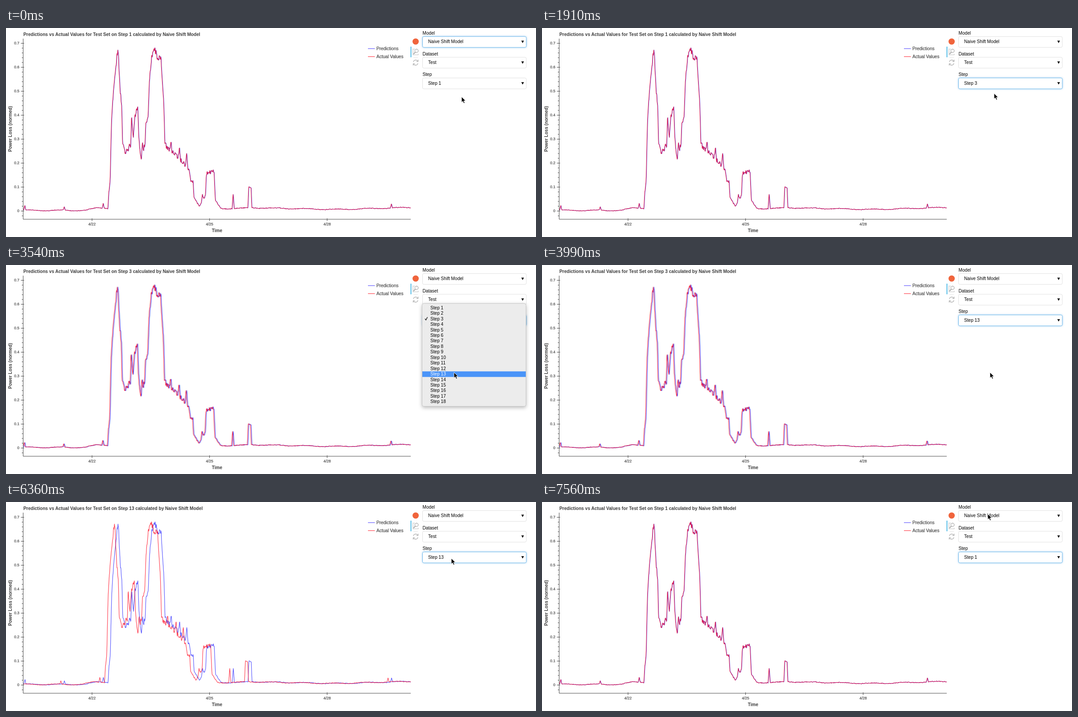
Animation, 1189 px wide and 471 px high, one loop 8 s. Source, as an HTML page:

```html
<!DOCTYPE html>
<html lang="en">
<head>
<meta charset="utf-8">
<title>Predictions vs actual values</title>
<style>
html, body { margin: 0; width: 100%; height: 100%; overflow: hidden; background: #fff; }
svg { display: block; font: 10px "Liberation Sans", Arial, sans-serif; }
.bold { font-weight: bold; font-size: 10.1px; fill: #3c3c3c; }
.soft { fill: #444; stroke: #444; stroke-width: .2; }
.tick { font-size: 8.4px; }
.panel { font-size: 10.1px; }
.axis { stroke: #444; fill: none; }
.icon { stroke: #a4a4a4; fill: none; stroke-width: 1.2; }
.box { fill: #fff; stroke: #e0e0e0; }
.box.focus { stroke: #6fb9ea; filter: drop-shadow(0 0 2px #66afe9a0); }
.line { fill: none; stroke-width: 1.2; stroke-linejoin: round; }
</style>
</head>
<body>
<svg width="1189" height="471" viewBox="0 0 1189 471">
  <clipPath id="plot"><rect x="39" y="24" width="869" height="407"/></clipPath>
  <text id="title" class="bold" x="39" y="17.5"></text>
  <g id="axes"></g>
  <text class="bold" x="473.5" y="459.5" text-anchor="middle">Time</text>
  <text class="bold" transform="translate(13 227.5) rotate(-90)" text-anchor="middle">Power Loss (normed)</text>
  <g clip-path="url(#plot)">
    <path id="predicted" class="line" stroke="#00f" stroke-opacity=".65"/>
    <path id="actual" class="line" stroke="#ff0018" stroke-opacity=".75"/>
  </g>
  <path d="M812 46.5h15.5" stroke="#6a62ff" stroke-width="1.3"/>
  <path d="M812 64.5h15.5" stroke="#ff4a55" stroke-width="1.3"/>
  <text class="soft" x="831" y="50">Predictions</text>
  <text class="soft" x="831" y="67.5">Actual Values</text>

  <circle cx="919" cy="30.5" r="7" fill="#f0643c"/>
  <path d="M908.5 42v24" stroke="#26aae1" stroke-width="1.6"/>
  <path d="M914 66.5h10" stroke="#e4e4e4"/>
  <path class="icon" stroke-dasharray="2 1" d="M917 47.5H913v13h12v-2"/>
  <g class="icon">
    <circle cx="921" cy="51.5" r="3.8"/>
    <path d="M918.3 54.5l-4 4" stroke-width="1.8"/>
    <path d="M914 76.5a5.2 5.2 0 0 1 9.5-2M924 79.5a5.2 5.2 0 0 1-9.5 2"/>
    <path d="M924.5 71.5v4h-4M913.5 84.5v-4h4"/>
  </g>
  <g id="panel" class="panel"></g>
  <g id="menu" class="panel"></g>
  <path id="cursor" d="M0 0v12.6l2.9-2.7 2.1 4.9 2.2-1-2.1-4.7h4z" stroke="#fff" stroke-width=".9"/>
</svg>
<script>
const $ = id => document.getElementById(id);
const LOOP = 8000, ROW = 12.45, SAMPLE = 0.61, ZERO = 412.5;

// Main bends of the load curve; spikes and jitter are laid over them.
const bends = [[39, 411], [180, 411], [205, 405], [229, 406], [231, 371], [234, 341], [237, 215],
  [241, 143], [251.5, 45], [257, 152], [260, 172], [262, 264], [269, 281], [280, 262], [282, 203],
  [286, 242], [290, 195], [296, 178], [299, 260], [304, 294], [312, 262], [314, 217], [319, 206],
  [322, 116], [327, 66], [332.5, 45], [340, 66], [348, 71], [354, 165], [357, 262], [411, 318],
  [415, 345], [420, 346], [422, 380], [434, 401], [448, 377], [450, 328], [467, 324], [470, 388],
  [482, 407], [543, 406], [545, 358], [550, 358], [552, 405], [742, 409], [925, 404]];
const spikes = [[42.5, 10], [131, 7], [218.5, 11], [306.5, 24], [370.5, 20], [389.5, 26], [405.5, 32],
  [441, 16], [510, 33], [865, 9]];

function curve() {
  let seed = 11, jitter = 0, k = 0, d = "";
  const random = () => (seed = seed * 16807 % 2147483647) / 2147483647;
  for (let i = 0, x = 39; x < 922; x = 39 + ++i * SAMPLE) {
    while (bends[k + 1][0] <= x) k++;
    const [[x0, y0], [x1, y1]] = bends.slice(k, k + 2);
    let y = y0 + (y1 - y0) * (x - x0) / (x1 - x0);
    for (const [at, height] of spikes) y -= height * Math.max(0, 1 - Math.abs(x - at) / 2.5);
    if (i % 2 == 0) jitter = random() * 2 - 1;
    y += Math.sin(x / 11) + jitter * Math.min(6, 0.5 + (ZERO - y) * 0.04);
    d += (i ? "L" : "M") + x.toFixed(2) + " " + Math.min(ZERO, y).toFixed(1);
  }
  return d;
}
const path = curve();
$("predicted").setAttribute("d", path);
$("actual").setAttribute("d", path);

let axes = '<path class="axis" d="M38.5 24V431H908', labels = "";
for (let i = -1; i < 36; i++) axes += `M38.5 ${ZERO - i * 10.8}h${i % 5 ? -3 : -5}`;
for (let i = 0; i < 8; i++) {
  const y = ZERO - i * 54;
  axes += `M38.5 ${y}h2`;
  labels += `<text class="soft tick" x="30" y="${y + 2.8}" text-anchor="end">${i / 10}</text>`;
}
for (let i = 0; i < 3; i++) {
  const x = 193 + i * 263.7;
  axes += `M${x} 429v6`;
  labels += `<text class="soft tick" x="${x}" y="444.5" text-anchor="middle">4/${22 + i * 3}</text>`;
}
$("axes").innerHTML = axes + '"/>' + labels;

$("panel").innerHTML = [["Model", "Naive Shift Model"], ["Dataset", "Test"], ["Step", ""]].map(([label, value], i) => {
  const y = i * 46.7;
  return `<text x="934.5" y="${15 + y}">${label}</text>
    <rect id="box${i}" class="box" x="934.5" y="${19.2 + y}" width="232.7" height="24.5" rx="3"/>
    <text id="value${i}" x="947" y="${34.3 + y}">${value}</text>
    <path d="M1156 ${28.5 + y}h6l-3 5.5z"/>`;
}).join("");

// The checked row lies over the select box; a menu that would not fit drops below it.
function menuTop(checked) {
  const top = 111.5 - (checked - 1) * ROW;
  return top < 0 ? 135 : top;
}

function drawMenu(checked, hover) {
  const top = menuTop(checked);
  let out = `<rect x="933.5" y="${top}" width="233" height="232" rx="4" fill="#ececec" stroke="#bdbdbd"
    stroke-width=".8" style="filter:drop-shadow(0 3px 4px #0004)"/>`;
  for (let i = 1; i <= 18; i++) {
    const y = top + 9.5 + (i - 1) * ROW, on = i == hover, ink = on ? "#fff" : "#000";
    if (on) out += `<rect x="934" y="${y - 5.8}" width="232" height="12.6" fill="#4a94f8"/>`;
    if (i == checked) out += `<path d="M940 ${y}l2 3 3.5-6.5" fill="none" stroke="${ink}" stroke-width="1.3"/>`;
    out += `<text x="952" y="${y + 3.6}" fill="${ink}">Step ${i}</text>`;
  }
  return out;
}

// Pointer moves: start, end, x, y. It rests in between.
const moves = [[0, 1, 1022, 155], [150, 650, 1014, 126], [800, 1170, 1013, 140], [1310, 1460, 1013, 151],
  [1760, 2400, 1021, 125], [2960, 3540, 1005, 242], [3990, 4700, 1013, 50], [5030, 5180, 1010, 20],
  [5180, 5620, 999, 127], [6510, 6800, 999, 144], [7110, 7500, 1000, 27]];
const visits = [
  { open: 800, pick: 1760, step: 3 },
  { open: 2960, pick: 3990, step: 13 },
  { open: 6510, pick: 7110, step: 1 }
];
const PLOT_DELAY = 300;
const stepAt = t => visits.reduce((step, v) => t >= v.pick ? v.step : step, 1);

function pointer(t) {
  let [, , x, y] = moves[0];
  for (const [start, end, toX, toY] of moves) {
    const u = Math.min(1, Math.max(0, (t - start) / (end - start))), ease = u * u * (3 - 2 * u);
    x += (toX - x) * ease;
    y += (toY - y) * ease;
  }
  return [x, y];
}

const shown = {};
function update(key, value, apply) {
  if (shown[key] !== value) apply(shown[key] = value);
}

function frame(now) {
  const t = now % LOOP, [x, y] = pointer(t), picked = stepAt(t);
  $("cursor").setAttribute("transform", `translate(${x} ${y})`);
  update("plot", stepAt(t - PLOT_DELAY), step => {
    $("title").textContent = `Predictions vs Actual Values for Test Set on Step ${step} calculated by Naive Shift Model`;
    $("actual").setAttribute("transform", `translate(${-step * SAMPLE})`);
  });
  update("value", picked, step => $("value2").textContent = "Step " + step);
  update("focus", t < visits[0].open ? 0 : 2, i => {
    for (const n of [0, 2]) $("box" + n).classList.toggle("focus", i == n);
  });
  const open = visits.some(v => t >= v.open && t < v.pick);
  const hover = open ? Math.floor((y - menuTop(picked) - 4) / ROW) + 1 : null;
  update("menu", hover, () => $("menu").innerHTML = open ? drawMenu(picked, hover) : "");
  requestAnimationFrame(frame);
}
requestAnimationFrame(frame);
</script>
</body>
</html>
```
